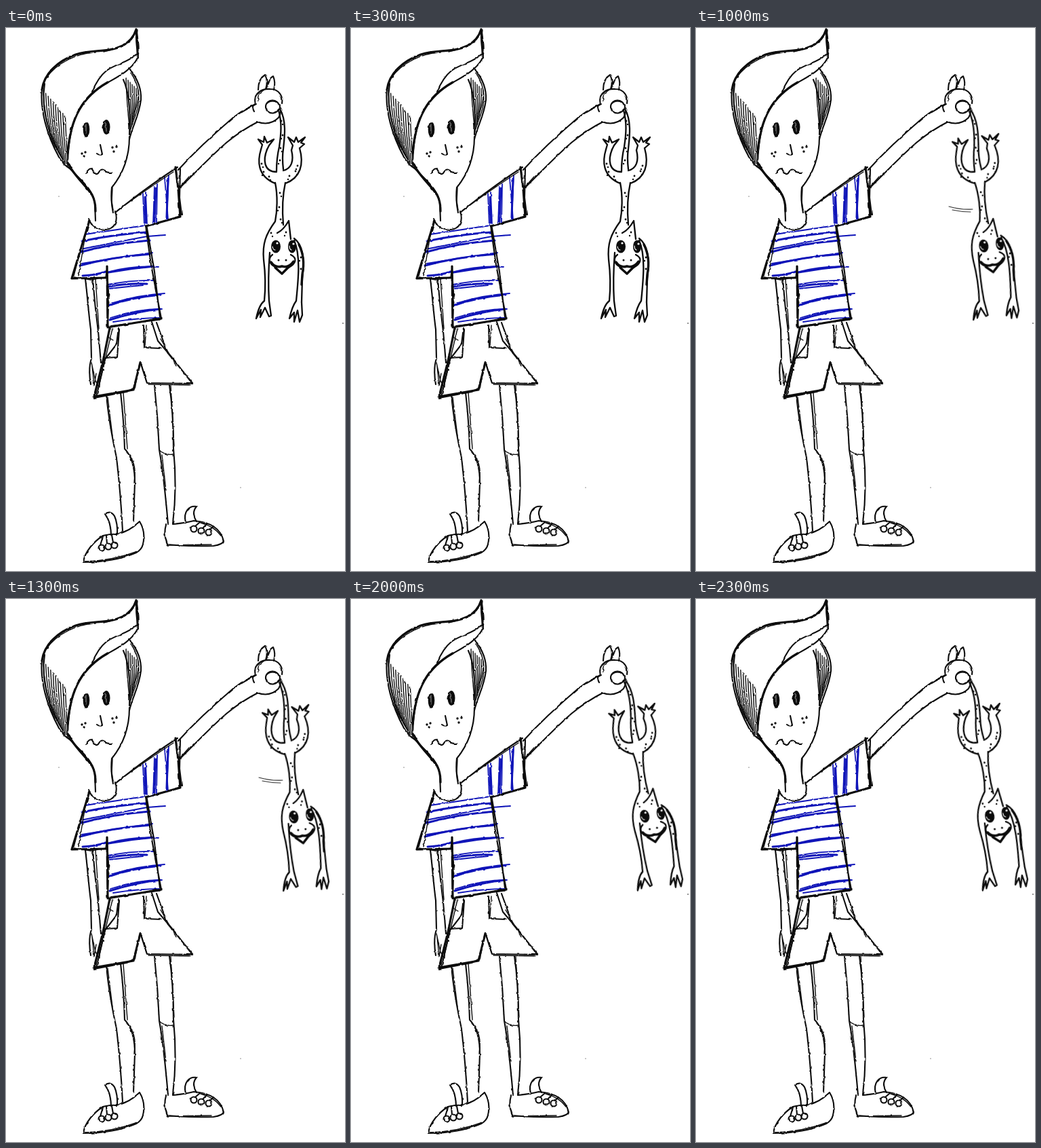
Recreate the animation shown at these times as an HTML page. Size 500 px wide and 800 px high, loop 2500 ms.

```html
<!DOCTYPE html>
<html lang="en">
<head>
<meta charset="utf-8">
<title>Boy with a lizard</title>
<style>
  html, body { margin: 0; width: 100%; height: 100%; overflow: hidden; background: #fff; }
  svg { display: block; width: 500px; height: 800px; }
  path, ellipse, circle { fill: none; stroke: #0b0b0b; stroke-width: 2.1; stroke-linecap: round; stroke-linejoin: round; }
  path.bold { stroke-width: 3.2; }
  .thin path, path.thin { stroke-width: 1.4; }
  .stripes path { stroke: #0f14b8; stroke-width: 3; }
  .stripes path.thin { stroke-width: 1.8; }
  .ink, .dots circle { fill: #0b0b0b; stroke: none; }
  .white { fill: #fff; stroke: none; }
  #boy, #hand { filter: url(#pen); }
  #lizard { transform-origin: 404px 118px; animation: swing 2.5s step-end infinite; }
  #lizard path { stroke-width: 2.3; }
  #lizard path.bold { stroke-width: 3.4; }
  #lizard path.thin { stroke-width: 1.2; }
  .glint { stroke: #fff; }
  .gray { stroke: #777; }
  #lizard .glint { stroke: #fff; }
  .whoosh { opacity: 0; animation: 2.5s step-end infinite; }
  .whoosh path { stroke: #333; stroke-width: 1.1; }
  #right { animation-name: right; }
  #left { animation-name: left; }
  @keyframes swing {
    0% { transform: rotate(0deg); }
    20% { transform: rotate(5.6deg); }
    40% { transform: rotate(-7.4deg); }
    60% { transform: rotate(-1.6deg); }
    80%, 100% { transform: rotate(-9.9deg); }
  }
  @keyframes right { 0% { opacity: 0; } 20% { opacity: 1; } 40%, 100% { opacity: 0; } }
  @keyframes left { 0% { opacity: 0; } 40% { opacity: 1; } 60%, 100% { opacity: 0; } }
</style>
</head>
<body>
<svg viewBox="0 0 500 800">
  <filter id="pen" filterUnits="userSpaceOnUse" x="0" y="0" width="500" height="800" color-interpolation-filters="sRGB">
    <feTurbulence type="fractalNoise" baseFrequency=".12" numOctaves="2" seed="4"/>
    <feDisplacementMap in="SourceGraphic" scale="2.5" xChannelSelector="R" yChannelSelector="G"/>
  </filter>

  <g id="boy">
    <g id="hatch" class="thin"></g>

    <g id="hair">
      <path class="bold" d="M53 91C56 68 75 49 103 39C128 31 150 37 172 26C183 20 189 12 192 2"/>
      <path d="M192 2C195 18 198 34 193 46C181 68 151 77 129 94C103 115 92 151 91 201"/>
      <path d="M192 39C178 52 163 52 148 63C138 71 132 82 127 94"/>
      <path class="bold" d="M193 3C191 20 195 29 194 43M150 80C113 101 95 132 91 184"/>
      <path class="thin" d="M59 74C76 50 106 37 132 36M188 13C181 25 163 31 144 35"/>
      <path d="M53 90C50 120 60 157 78 190Q85 202 94 207"/>
      <path d="M57 82C51 119 63 161 87 199"/>
      <path d="M183 61C194 75 200 91 199 106C196 130 187 143 182 164"/>
      <path d="M173 76C180 91 184 118 182 157"/>
      <path class="thin" d="M184 66C196 83 198 101 194 119L183 151"/>
    </g>

    <g id="face">
      <path class="bold" d="M92 200C99 216 117 231 127 246Q132 255 132 270"/>
      <path d="M94 207C109 223 129 238 131 258L132 284"/>
      <path d="M182 160C182 187 175 212 156 235Q154 254 158 272"/>
      <path class="thin" d="M157 236L156 255L158 268"/>
      <ellipse class="ink" cx="118.500" cy="149.500" rx="4.800" ry="11.500"/>
      <ellipse class="ink" cx="148" cy="146" rx="5.500" ry="11"/>
      <path class="thin gray" d="M118 142v13M147 139l1 13"/>
      <path d="M139 172L142 186Q138 188 134 185"/>
      <path d="M118 214Q123 205 127 208Q132 218 136 214Q140 207 144 209Q148 214 156 213"/>
      <g class="dots">
        <circle cx="112" cy="185" r="1.700"/><circle cx="117" cy="183" r="1.700"/><circle cx="115" cy="189" r="1.700"/>
        <circle cx="157" cy="176" r="1.700"/><circle cx="163" cy="175" r="1.700"/><circle cx="159" cy="182" r="1.700"/>
      </g>
    </g>

    <g class="stripes">
      <path class="thin" d="M202 244L204 291M206 242L208 288M219 233L217 290M223 230L222 287M234 220L239 282M240 217L237 281"/>
      <path d="M239 222L237 279M205 249L206 287M221 236L219 285"/>
      <path d="M112 314Q160 304 206 301M111 330Q158 317 212 313M109 350Q158 337 214 333M113 365Q133 364 147 359"/>
      <path class="thin" d="M117 304Q165 297 205 291M110 326Q155 317 208 307L235 305M112 347Q165 338 216 331M152 359Q190 349 225 352"/>
      <path d="M151 360Q184 354 218 351M152 381Q178 376 208 377M151 409Q184 397 228 393M153 430Q190 418 227 414"/>
      <path class="thin" d="M151 378Q185 371 220 372M153 384Q178 381 202 379M157 405Q199 393 234 391M158 433Q195 427 229 427M154 427Q193 414 230 414"/>
    </g>

    <g id="shirt">
      <path d="M122 281C125 292 136 297 147 297C160 296 166 285 161 270"/>
      <path d="M161 272Q207 235 253 205"/>
      <path class="thin" d="M164 269Q207 238 247 212"/>
      <path class="bold" d="M250 205L254 237L257 278L206 292M123 284L97 369L147 368M149 351L150 441L229 428"/>
      <path d="M257 207L256 250L259 275"/>
      <path d="M206 292L214 349L229 428M208 295L219 359L227 426"/>
      <path class="thin" d="M119 293L107 365M114 312L100 365M100 367L125 371L148 367M147 367L149 352L152 399L150 434M153 439L226 430"/>
    </g>

    <g id="arms">
      <path d="M254 209C275 186 302 160 335 132Q352 119 369 112"/>
      <path d="M257 235C278 214 300 191 325 169Q348 150 372 138"/>
      <path class="thin" d="M256 235L270 219M345 126L366 114"/>
      <path d="M117 370C120 393 122 423 125 444L126 487Q121 502 125 525M128 370Q131 409 136 447L140 493L144 504"/>
      <path class="thin" d="M132 370L137 443M127 498L130 527L133 509M126 493L132 520L138 529L138 508"/>
    </g>

    <g id="shorts">
      <path class="bold" d="M153 442L143 491L130 543L188 533L198 493"/>
      <path d="M166 442L163 466L146 488L133 544M130 545L178 536L190 530M198 492L208 523L275 524"/>
      <path d="M215 433L224 461L247 488L275 524M222 434L238 478L275 523"/>
      <path class="thin" d="M157 443L137 528M196 502L190 530M199 493L207 521M210 525L272 526M228 458L251 498"/>
      <path d="M167 444L164 485L146 486M203 438L204 471L229 472"/>
      <path class="thin" d="M207 438L205 468M150 455L158 460"/>
    </g>

    <g id="legs">
      <path d="M148 540C151 574 158 610 163 633Q169 684 172 741"/>
      <path d="M169 537Q174 580 175 620C185 630 190 648 190 670L188 727"/>
      <path class="thin" d="M173 537L179 620M178 625Q194 640 189 669M150 544L157 601"/>
      <path d="M219 527Q224 574 226 621Q233 661 239 731M241 526Q247 567 247 620C250 650 251 690 246 730"/>
      <path class="thin" d="M243 527L248 616M226 622Q235 630 247 628M230 629L236 681"/>
    </g>

    <g id="shoes">
      <path d="M114 787C116 772 129 757 143 748Q154 745 163 746Q182 742 197 727Q205 740 203 755Q202 768 192 773C171 782 143 787 114 787Z"/>
      <path d="M155 747Q155 728 146 716Q154 710 160 719Q165 730 164 747"/>
      <path class="thin" d="M116 786Q157 785 194 771M166 745L177 741"/>
      <circle cx="141" cy="766" r="4.500"/><circle cx="151" cy="764" r="4.500"/><circle cx="160" cy="762" r="4.500"/>
      <path d="M139 762L143 749M149 760L148 748M158 758L156 747"/>
      <path d="M236 732Q232 746 238 761Q270 764 306 763Q319 761 321 756C317 738 302 728 277 726Q259 730 246 731"/>
      <path d="M265 728C261 713 270 703 281 705Q273 714 281 727"/>
      <path class="thin" d="M238 762L303 761M287 729Q307 734 317 748"/>
      <circle cx="277" cy="738" r="4.500"/><circle cx="288" cy="741" r="4.500"/><circle cx="299" cy="743" r="4.500"/>
      <path d="M279 734L286 728M290 737L296 731M301 739L306 734"/>
    </g>
  </g>

  <g id="lizard">
    <path d="M402 121C407 139 406 155 403 175Q399 192 399 211M404 119C414 137 411 160 409 178Q407 191 409 208"/>
    <path d="M376 179C371 195 370 218 397 229M385 179C379 194 380 212 399 212"/>
    <path d="M433 177C440 201 434 221 412 229M421 180C425 196 421 207 409 210"/>
    <path d="M376 179L378 172L372 164L380 168L381 160L385 169L395 164L388 173L385 179"/>
    <path d="M421 180L423 173L416 161L425 168L428 161L431 168L441 161L435 169L440 171L433 177"/>
    <path d="M397 228C401 247 400 270 397 285C383 304 378 318 380 341Q384 373 381 402M412 228Q406 255 409 290"/>
    <path d="M400 302Q409 298 417 284L420 311"/>
    <path d="M389 331Q386 370 388 402M425 310C437 319 441 340 437 369L436 404M425 313C435 335 431 372 428 402"/>
    <path class="bold" d="M432 319Q442 339 437 363L436 378"/>
    <path d="M381 402Q373 408 369 428L376 415L375 426L382 412L388 425L391 424L388 402"/>
    <path d="M428 402Q422 410 418 428L425 419L425 433L430 416L433 433L437 423L436 404"/>
    <path d="M393 334C386 339 388 348 397 352M420 334C430 339 428 347 417 353"/>
    <path class="bold" d="M391 345Q397 354 407 351Q417 354 424 344M397 353L407 362L417 352"/>
    <ellipse class="ink" cx="398" cy="322" rx="7" ry="9.500"/>
    <ellipse class="ink" cx="422" cy="322" rx="6" ry="9.500"/>
    <circle class="white" cx="400" cy="317" r="1.600"/><circle class="white" cx="424" cy="318" r="1.600"/>
    <path class="thin glint" d="M393 322q1 5 4 5M418 321q0 5 3 6"/>
    <g id="spots" class="dots"></g>
  </g>

  <g id="hand">
    <path d="M372 91Q372 75 382 69Q387 78 383 90M384 89Q387 74 394 71Q398 80 395 91"/>
    <path d="M368 112C364 97 376 89 390 90C402 90 409 100 407 111"/>
    <path d="M368 112Q361 114 366 123M370 138Q389 145 402 132Q405 127 405 123"/>
    <ellipse cx="393" cy="116" rx="10" ry="9.500"/>
    <path class="thin" d="M384 112Q390 105 401 110L407 121M372 107Q370 98 377 94"/>
  </g>

  <g id="right" class="whoosh"><path d="M400 262Q418 260 432 252M399 266Q415 264 425 259"/></g>
  <g id="left" class="whoosh"><path d="M373 263Q390 268 408 267M378 268Q392 271 405 271"/></g>

  <g class="dots">
    <circle cx="497" cy="435" r=".8"/><circle cx="78" cy="248" r=".6"/><circle cx="346" cy="677" r=".6"/>
  </g>
</svg>
<script>
  const add = (id, tag, attrs) => {
    const node = document.createElementNS("http://www.w3.org/2000/svg", tag);
    for (const key in attrs) node.setAttribute(key, attrs[key]);
    document.getElementById(id).append(node);
  };
  const line = (x1, y1, x2, y2) =>
    add("hatch", "path", { d: `M${x1} ${y1}Q${x1 + 1} ${(y1 + y2) / 2} ${x2} ${y2}` });

  // Shading at the back of the hair, then beside the ear
  for (let i = 0; i < 10; i++) line(55 + i * 3.6, 92 + i * 4.2, 70 + i * 2.4, 172 + i * 3.5);
  for (let i = 0; i < 7; i++) line(177 + i * 3, 74 + i * 3, 183 + i * 1.2, 153 - i * 5);

  // Pairs of skin spots running along the tail, back and legs
  const spots = [[406, 137], [408, 158], [405, 177], [404, 195], [377, 200], [380, 212], [388, 219],
    [430, 203], [427, 211], [418, 218], [404, 243], [403, 264], [405, 282], [413, 301], [391, 302],
    [435, 338], [435, 355]];
  spots.forEach(([x, y], i) => {
    add("spots", "circle", { cx: x, cy: y, r: 1.4 });
    add("spots", "circle", { cx: x + (i % 2 ? -2 : 2), cy: y + 5, r: 1.2 });
  });
  for (const x of [402, 413]) add("spots", "circle", { cx: x, cy: 342, r: 1.5 });
</script>
</body>
</html>
```
